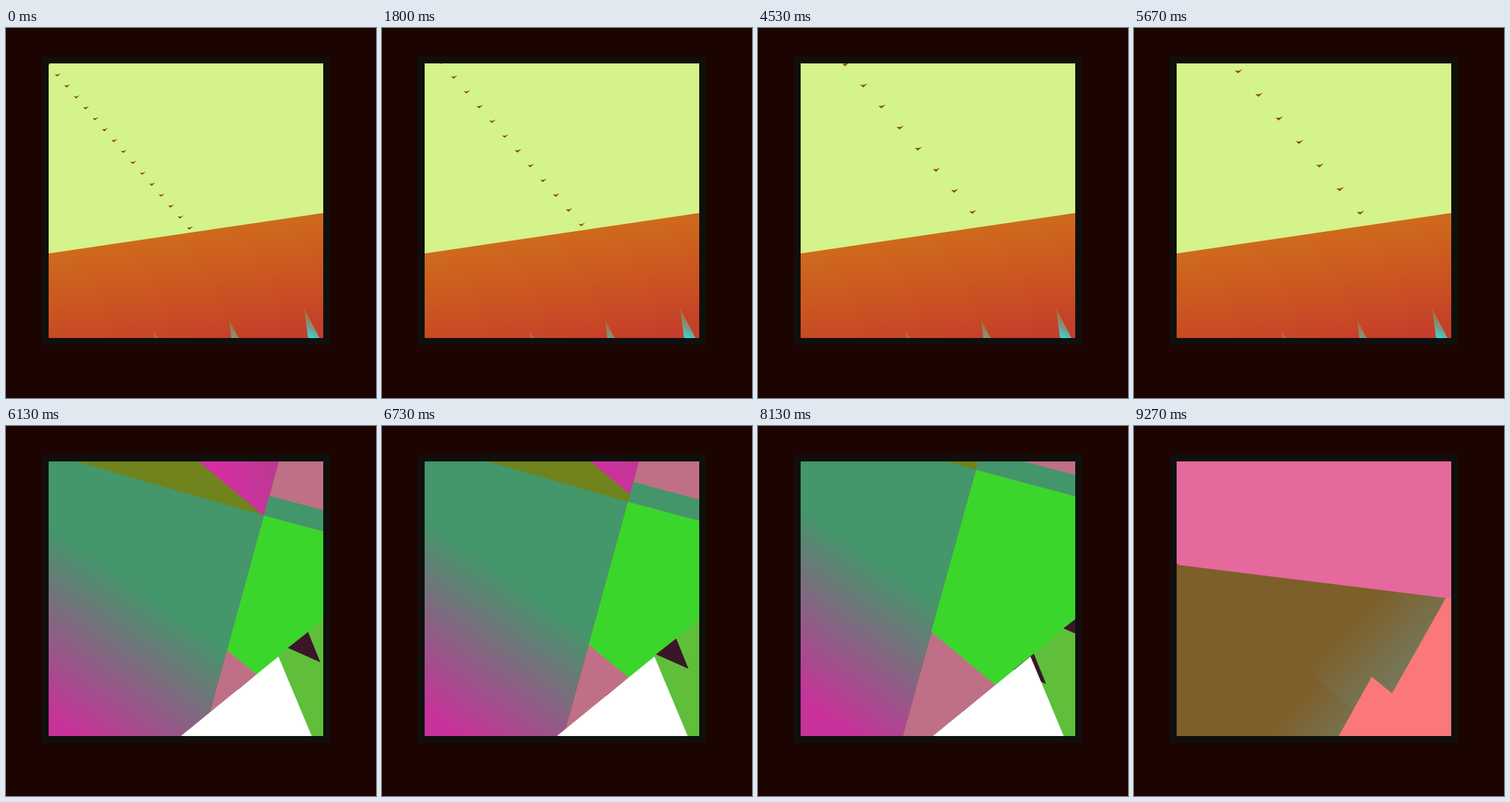
Animation of 512 by 512 pixels, one loop 9.34 s. Source, as an HTML page with a canvas:

```html
<!DOCTYPE html>
<html lang="en">
<head>
<meta charset="utf-8">
<title>Framed landscapes</title>
<style>
  html, body { margin: 0; width: 100%; height: 100%; overflow: hidden; background: #1c0500; }
  canvas { display: block; width: 512px; height: 512px; }
</style>
</head>
<body>
<canvas id="stage" width="512" height="512"></canvas>
<script>
const ctx = document.getElementById('stage').getContext('2d');
const LOOP = 9340;
const STEP = 1000 / 15;
const PANEL = { x: 59, y: 49, size: 380 };
const MOSAIC_START = 90;
const DUSK_START = 129;

const lerp = (a, b, k) => a + (b - a) * k;
const mix = (a, b, k) => a.map((v, i) => lerp(v, b[i], k));
const shift = ([x, y], [dx, dy], k = 1) => [x + dx * k, y + dy * k];

function poly(fill, ...points) {
  ctx.beginPath();
  points.forEach(([x, y]) => ctx.lineTo(x, y));
  ctx.closePath();
  ctx.fillStyle = fill;
  ctx.fill();
}

function gradient([x0, y0], [x1, y1], ...colors) {
  const g = ctx.createLinearGradient(x0, y0, x1, y1);
  colors.forEach((c, i) => g.addColorStop(i / (colors.length - 1), c));
  return g;
}

function fillPanel(color) {
  ctx.fillStyle = color;
  ctx.fillRect(PANEL.x, PANEL.y, PANEL.size, PANEL.size);
}

// Each key: step, lead bird x and y, spacing x and y.
const FLOCK = [
  [0, 398.3, 442.7, 13.07, 15.11],
  [27, 400, 414.9, 17.65, 20.42],
  [51, 398, 389.1, 22.19, 25.77],
  [85, 397.8, 353, 28.1, 32.58]
];

function flockAt(step) {
  let i = 0;
  while (i < FLOCK.length - 2 && step > FLOCK[i + 1][0]) i++;
  const [a, b] = [FLOCK[i], FLOCK[i + 1]];
  return mix(a, b, (step - a[0]) / (b[0] - a[0]));
}

function drawBird(x, y, size) {
  const at = (dx, dy) => [x + dx * size, y + dy * size];
  poly('#8a4b0a', at(-4.2, -0.6), at(0, -0.5), at(4.2, -2.2), at(-0.6, 2.4));
}

function drawSpike(dx, dy) {
  const at = (x, y) => [x + dx, y + dy];
  const fill = gradient(at(432, 404), at(418, 428), '#a8703f', '#7f9580', '#27e2de');
  poly(fill, at(412.5, 388), at(436, 433), at(440, 460), at(422, 460), at(418, 429));
}

function drawHill(step) {
  fillPanel('#d4f38a');
  const [, x, y, dx, dy] = flockAt(step);
  const size = 1 + step * 0.003;
  for (let n = 0; n < 32; n++) drawBird(x - n * dx, y - n * dy, size);

  const soil = gradient([250, 284], [275, 455], '#cf6a1c', '#ca5322', '#c43a2c');
  poly(soil, [59, 312], [439, 256], [439, 429], [59, 429]);
  for (let i = 0; i < 3; i++) drawSpike(-104 * i, 15.4 * i);
}

function drawMosaic(step) {
  const k = (step - 92) / 19;
  const hub = mix([357, 124], [322, 84], k);
  const greenCorner = mix([306, 310], [264, 294], k);
  const ridge = [lerp(267, 313, k), 49];
  const down = [-0.275, 1];
  const right = [1, 0.267];
  const left = [-1, -0.288];
  const slope = [1, 0.84];

  fillPanel('#bf7086');

  ctx.save();
  ctx.beginPath();
  [shift(hub, down, -400), shift(hub, down, 500), [-300, 600], [-300, -300]]
    .forEach(([x, y]) => ctx.lineTo(x, y));
  ctx.clip();
  fillPanel(gradient([290, 80], [380, 50], '#d62da2', '#b83b91'));
  poly('#70831d', shift(ridge, slope, -400), shift(ridge, slope, 400), [-300, 600]);
  ctx.restore();

  const top = lerp(135, 120, k);
  const wash = gradient([59, top], [-65, top + 178], '#43976a', '#c8329a');
  poly(wash, hub, shift(hub, left, 500), [-300, 600], shift(hub, down, 500));

  const bandTop = shift(hub, [7.5, -27.5]);
  poly('#43966a', hub, bandTop, shift(bandTop, right, 250), shift(hub, right, 250));
  poly('#3bd62b', hub, shift(hub, right, 250), shift(greenCorner, [1, 0.83], 350), greenCorner);

  poly('#5fbf3b', [377, 319], [439, 267.5], [439, 429], [423, 429]);
  const slide = [lerp(390, 367, k), lerp(307, 326, k)];
  for (let i = -2; i <= 2; i++) {
    const p = shift(slide, [69, -57], i);
    poly('#3b1628', p, shift(p, [28, -22]), shift(p, [45, 20]));
  }
  poly('#fff', [242, 429], [377, 319], [423, 429]);
}

function drawDusk() {
  const brown = '#7d5f2a';
  const sage = '#75785a';
  fillPanel('#e5699c');
  poly('#fb7878', [431, 238], [439, 239], [439, 429], [283, 429], [329, 347]);
  poly(gradient([290, 280], [365, 355], brown, sage),
    [59, 192], [431.5, 238], [357, 370], [329, 347], [283, 429], [59, 429]);
  poly(gradient([230, 375], [302, 447], brown, sage),
    [59, 190], [232, 333], [300, 390], [305, 390], [283, 429], [59, 429]);
}

function draw(step) {
  ctx.fillStyle = '#1c0500';
  ctx.fillRect(0, 0, 512, 512);
  ctx.fillStyle = '#0f0f0d';
  ctx.fillRect(50, 40, 398, 398);

  ctx.save();
  ctx.beginPath();
  ctx.rect(PANEL.x, PANEL.y, PANEL.size, PANEL.size);
  ctx.clip();
  if (step < MOSAIC_START) drawHill(step);
  else if (step < DUSK_START) drawMosaic(step);
  else drawDusk();
  ctx.restore();
}

const start = performance.now();
function tick(now) {
  const time = Math.max(0, now - start) % LOOP;
  draw(Math.min(139, Math.floor((time + 4) / STEP)));
  requestAnimationFrame(tick);
}
draw(0);
requestAnimationFrame(tick);
</script>
</body>
</html>
```
